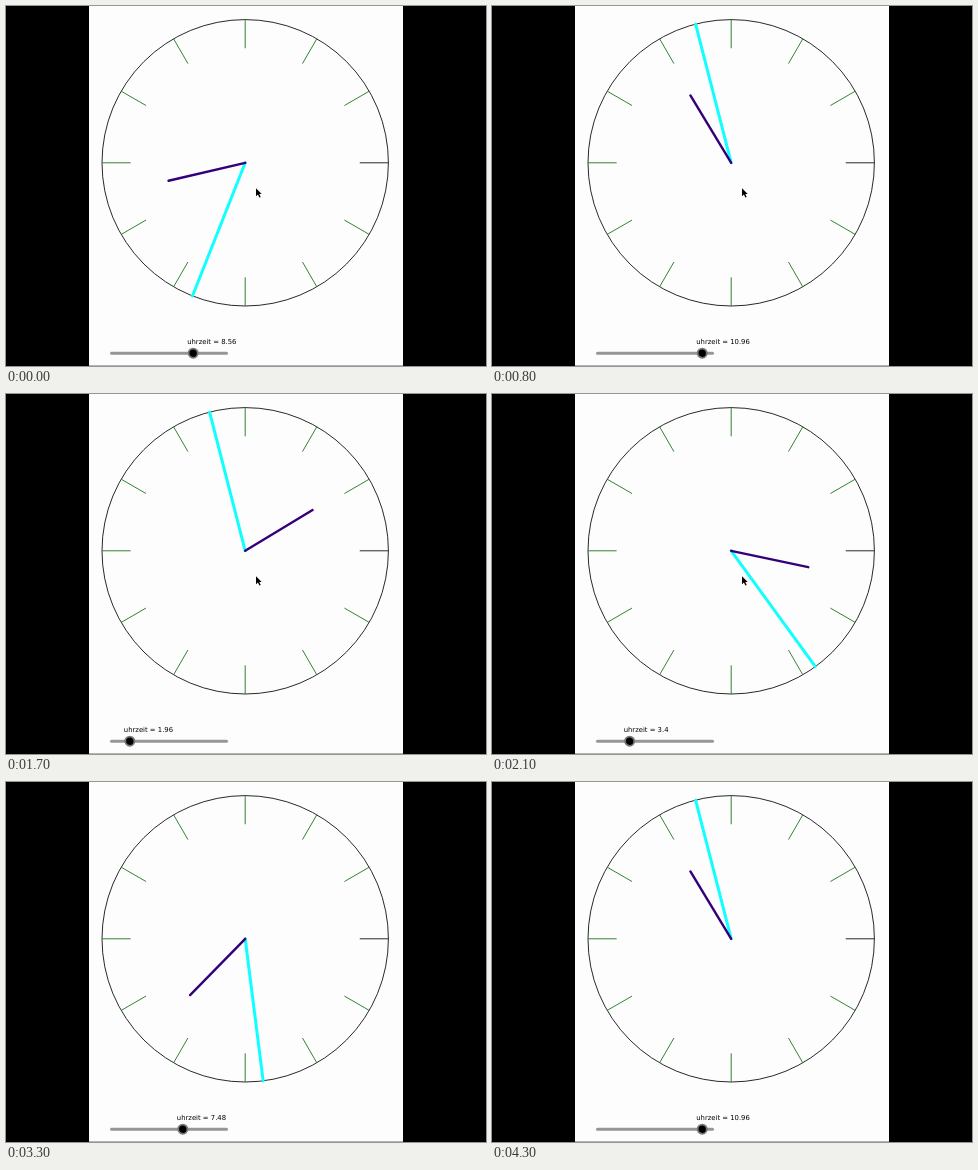
Recreate the animation shown at these times as an HTML page. Size 480 px wide and 360 px high, loop 4400 ms.

```html
<!DOCTYPE html>
<html lang="de">
<head>
<meta charset="utf-8">
<title>Uhrzeit</title>
<style>
  html, body { margin: 0; width: 100%; height: 100%; overflow: hidden; background: #000; }
  svg { display: block; width: 100%; height: 100%; }
  text { font: 6.85px "DejaVu Sans", sans-serif; text-rendering: geometricPrecision; }
</style>
</head>
<body>
<svg viewBox="0 0 480 360">
  <rect width="480" height="360"/>
  <rect x="83" width="314" height="360" fill="#fdfdfd"/>
  <path d="M83 359.5H397" stroke="#b4b4b4"/>
  <circle cx="239.2" cy="156.8" r="143.2" fill="none" stroke="#111" stroke-width=".9"/>
  <g id="ticks" stroke-width=".9"></g>
  <g stroke-linecap="round">
    <line id="minute" stroke="#1ff" stroke-width="3"/>
    <line id="hour" stroke="#33007a" stroke-width="2.4"/>
    <path d="M105.5 347.2H220.5" stroke="#969696" stroke-width="3"/>
  </g>
  <g id="slider">
    <circle cy="347.2" r="4.6" stroke="#777" stroke-width="1.8"/>
    <text id="label" x="-6" y="338.4"></text>
  </g>
  <path id="cursor" d="M250 182.2v8l1.9-1.7 1.5 3 1.3-.6-1.4-2.9h2.4z" stroke="#fff" stroke-width="1" paint-order="stroke"/>
</svg>
<script>
const LOOP = 4400, STEP = 100;
const CX = 239.2, CY = 156.8, R = 143.2;
const $ = id => document.getElementById(id);

// Point on the dial; turn 0 is twelve o'clock
const polar = (turn, r) => {
  const a = turn * 2 * Math.PI;
  return [CX + r * Math.sin(a), CY - r * Math.cos(a)];
};

function setLine(el, [x1, y1], [x2, y2]) {
  Object.entries({ x1, y1, x2, y2 }).forEach(([k, v]) => el.setAttribute(k, v.toFixed(2)));
}

for (let i = 0; i < 12; i++) {
  const tick = document.createElementNS("http://www.w3.org/2000/svg", "line");
  tick.setAttribute("stroke", i === 3 ? "#111" : "#1c751c");
  setLine(tick, polar(i / 12, R * 0.8), polar(i / 12, R));
  $("ticks").append(tick);
}

// The slider moves in units of 0.12 h: slower at first, then mostly three per step
const units = n => n < 8 ? Math.floor(2.5 * n) : 3 * n - 3 - Math.ceil(n / 8);

function draw(ms) {
  const n = Math.floor(ms / STEP);
  const time = (856 + 12 * units(n)) % 1200 / 100;
  setLine($("minute"), [CX, CY], polar(time % 1, R));
  setLine($("hour"), [CX, CY], polar(time / 12, R * 0.55));
  $("slider").setAttribute("transform", `translate(${(105 + 9.6 * time).toFixed(2)} 0)`);
  $("label").textContent = `uhrzeit = ${time}`;
  $("cursor").style.display = ms < 2500 ? "" : "none";
}

const start = performance.now();
function frame() {
  draw((performance.now() - start) % LOOP);
  requestAnimationFrame(frame);
}
frame();
</script>
</body>
</html>
```
